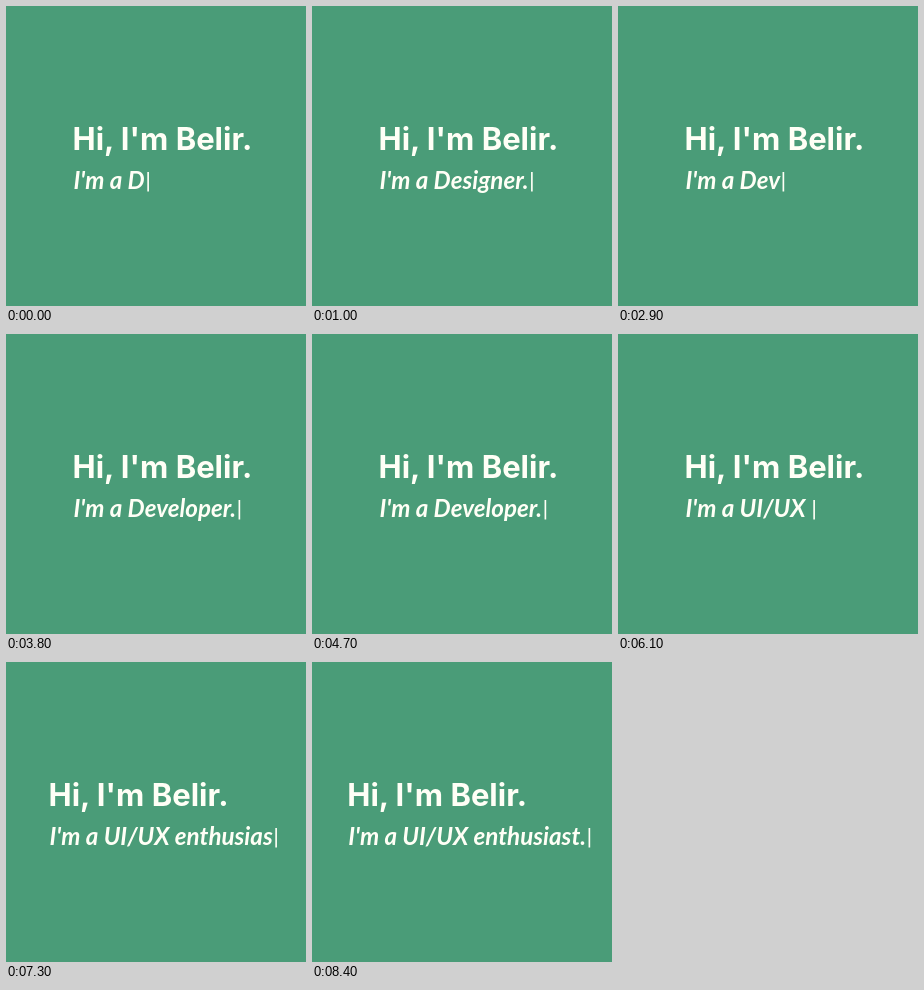
Recreate the animation shown at these times as an HTML page. Size 300x300 px, loop 8.5 s.

```html
<!DOCTYPE html>
<html lang="en">
<head>
<meta charset="utf-8">
<title>Typing introduction</title>
<style>
  html, body { margin: 0; height: 100%; overflow: hidden; background: #4a9c78; }
  svg { display: block; width: 100%; height: 100%; }
  text { fill: #fffff6; }
  #hello { font: 700 31px Inter, sans-serif; }
  #role { font: italic 700 24.2px Lato, sans-serif; }
  #cursor { font: oblique 400 20px "DejaVu Sans", sans-serif; }
</style>
</head>
<body>
<svg viewBox="0 0 300 300">
  <text id="hello" y="144">Hi, I'm Belir.</text>
  <text id="role" y="183"><tspan id="typed"></tspan><tspan id="cursor" dy="-2">|</tspan></text>
</svg>
<script>
const [hello, role, typed] = ['hello', 'role', 'typed'].map(id => document.getElementById(id));
const words = ['Designer.', 'Developer.', 'UI/UX enthusiast.'];

// Times in ms; the loop begins with the first letter already typed.
const LOOP = 8500, LEAD = 150;
const TYPE = 125, HOLD = 1000, ERASE = 50, PAUSE = 75;
const CENTER = 157.5, MAX_LEFT = 66.5;

function wordAt(t) {
  for (const word of words) {
    const n = word.length, typing = n * TYPE + HOLD;
    const total = typing + n * ERASE + PAUSE;
    if (t < total) {
      const erased = Math.max(0, Math.floor((t - typing) / ERASE));
      const shown = Math.min(n, Math.floor(t / TYPE)) - erased;
      return word.slice(0, Math.max(0, shown));
    }
    t -= total;
  }
  return '';
}

function draw(now) {
  typed.textContent = "I'm a " + wordAt(now % LOOP + LEAD);

  // The block stays centred once the typed line outgrows the heading.
  const left = Math.min(MAX_LEFT, CENTER - role.getComputedTextLength() / 2);
  hello.setAttribute('x', left);
  role.setAttribute('x', left + 1);
}

const start = performance.now();
function tick() {
  draw(performance.now() - start);
  requestAnimationFrame(tick);
}
tick();
</script>
</body>
</html>
```
